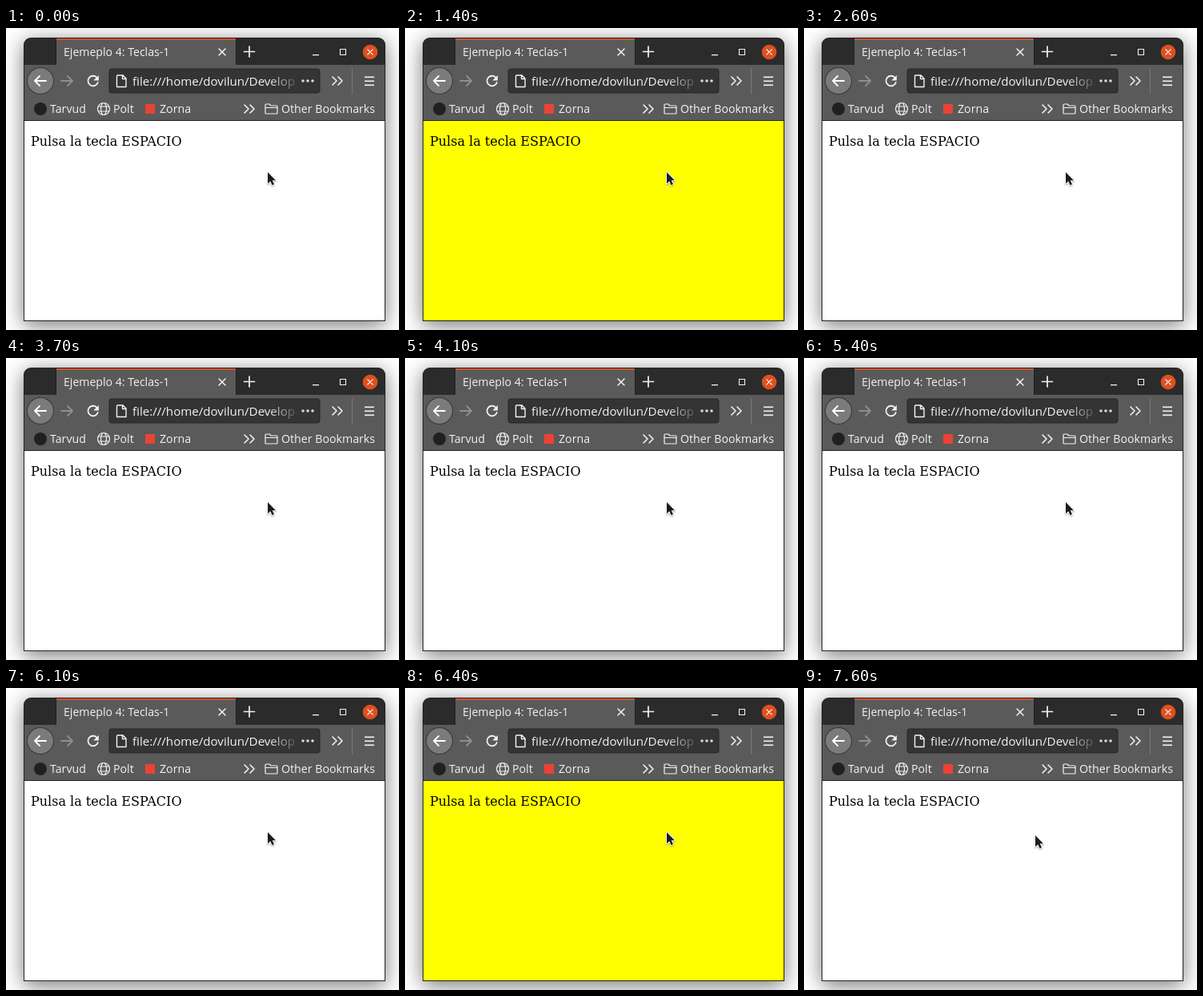
Animation of 491 by 377 pixels, one loop 8000 ms. Source, as an HTML page with a canvas:

```html
<!DOCTYPE html>
<html lang="es">
<head>
<meta charset="utf-8">
<title>Teclas</title>
<style>
html, body { margin: 0; width: 100%; height: 100%; overflow: hidden; background: #fff; }
canvas { display: block; width: 491px; height: 377px; }
</style>
</head>
<body>
<canvas id="stage"></canvas>
<script>
const W = 491, H = 377, LOOP = 8000;
const canvas = document.getElementById('stage');
const ctx = canvas.getContext('2d');
const dpr = window.devicePixelRatio || 1;
canvas.width = W * dpr;
canvas.height = H * dpr;

const UI = '"Open Sans", "Noto Sans", sans-serif';
const SERIF = '"DejaVu Serif", "Noto Serif", serif';
const LIGHT = '#f2f2f0', BAR = '#5a5a5a', DARK = '#2b2b2b';

// Each press of the space bar toggles the page colour.
const presses = [1400, 2600, 3500, 3700, 3900, 4100, 5000, 5400, 5700, 6100, 6400, 6900];

function rect(x, y, w, h, color) {
  ctx.fillStyle = color;
  ctx.fillRect(x, y, w, h);
}

function rounded(x, y, w, h, r, color) {
  ctx.beginPath();
  ctx.roundRect(x, y, w, h, r);
  ctx.fillStyle = color;
  ctx.fill();
}

function disc(x, y, r, color) {
  ctx.beginPath();
  ctx.arc(x, y, r, 0, Math.PI * 2);
  ctx.fillStyle = color;
  ctx.fill();
}

function stroke(d, color = LIGHT, width = 1.6) {
  ctx.strokeStyle = color;
  ctx.lineWidth = width;
  ctx.lineCap = ctx.lineJoin = 'round';
  ctx.stroke(new Path2D(d));
}

function text(str, x, y, size, color = LIGHT, family = UI) {
  ctx.font = `${size}px ${family}`;
  ctx.fillStyle = color;
  ctx.fillText(str, x, y);
}

function chevrons(x, y) {
  stroke(`M${x} ${y - 5}l5 5l-5 5M${x + 7} ${y - 5}l5 5l-5 5`);
}

function drawFrame() {
  ctx.save();
  ctx.shadowColor = 'rgba(0,0,0,.55)';
  ctx.shadowBlur = 26 * dpr;
  ctx.shadowOffsetY = 5 * dpr;
  rounded(22, 12, 452, 354, [9, 9, 0, 0], '#232323');
  ctx.restore();
  rounded(23, 13, 450, 34, [8, 8, 0, 0], DARK);
  rect(23, 46, 450, 69, BAR);
  rect(23, 115, 450, 1, '#242424');
}

function drawTabs() {
  rect(62, 13, 226, 33, '#1f1f1f');
  rect(63, 13, 224, 33, BAR);
  rect(63, 13, 224, 2, '#c9552c');
  text('Ejemeplo 4: Teclas-1', 72, 35, 14.1);
  stroke('M266 26l8 8m0 -8l-8 8', LIGHT, 1.5);
  stroke('M297.5 29.5h13m-6.5 -6.5v13', LIGHT, 1.7);
  rect(383, 33, 8, 1.3, LIGHT);
  ctx.strokeStyle = LIGHT;
  ctx.lineWidth = 1.1;
  ctx.strokeRect(417.5, 26.5, 7, 7);
  disc(455, 30, 9.3, '#dd5021');
  stroke('M451.8 26.8l6.4 6.4m0 -6.4l-6.4 6.4', '#fff', 1.2);
}

function drawToolbar() {
  disc(43, 66, 17, '#373737');
  disc(43, 66, 16, '#7b7b7b');
  stroke('M50 66h-14m6 -6l-6 6l6 6', '#fff', 1.8);
  stroke('M69 66h14m-6 -6l6 6l-6 6', '#8f8f8f', 1.8);
  stroke('M113.8 62.2A6.3 6.3 0 1 0 114.8 68', LIGHT, 1.8);
  ctx.fillStyle = LIGHT;
  ctx.fill(new Path2D('M115.8 59v6.5h-6.5z'));

  rounded(128.5, 50.5, 264, 31, 4, '#272727');
  rounded(129.5, 51.5, 262, 29, 3, '#343434');
  stroke('M139.5 59h6.5l4 4v10.5h-11.5v-13.5a1 1 0 0 1 1 -1zM145.5 59.5v4h4', LIGHT, 1.4);
  const fade = ctx.createLinearGradient(328, 0, 364, 0);
  fade.addColorStop(0, LIGHT);
  fade.addColorStop(1, 'rgba(242,242,240,.12)');
  ctx.save();
  ctx.beginPath();
  ctx.rect(156, 52, 207, 28);
  ctx.clip();
  text('file:///home/dovilun/Develop', 158, 72, 15.1, fade);
  ctx.restore();
  for (const x of [371, 377, 383]) disc(x, 66, 1.8, '#d8d8d8');

  chevrons(408, 66);
  rect(432, 50, 1, 33, '#777');
  for (const y of [61, 66, 71]) rect(448, y - 0.5, 12, 1.6, LIGHT);
}

function drawBookmarks() {
  disc(43, 101, 8, '#202020');
  text('Tarvud', 55, 106, 14.2);
  stroke('M114.5 101a7.5 7.5 0 1 0 15 0a7.5 7.5 0 1 0 -15 0' +
    'M118.5 101a3.5 7.5 0 1 0 7 0a3.5 7.5 0 1 0 -7 0' +
    'M115.5 98h13m-13 6h13', LIGHT, 1.2);
  text('Polt', 134, 106, 14.2);
  rect(174, 95, 12, 12, '#ea4335');
  text('Zorna', 192, 106, 14.2);
  chevrons(298, 101);
  stroke('M324 106v-10a1 1 0 0 1 1 -1h4l2 2h7a1 1 0 0 1 1 1v8a1 1 0 0 1 -1 1h-13a1 1 0 0 1 -1 -1zM324 99.5h15', LIGHT, 1.2);
  text('Other Bookmarks', 344, 106, 14.2);
}

function drawPage(t) {
  const active = presses.filter(p => p <= t).length % 2;
  rect(23, 116, 450, 249, active ? '#ffff00' : '#fff');
  text('Pulsa la tecla ESPACIO', 31, 147, 16, '#000', SERIF);
}

function drawCursor(t) {
  // The pointer moves in four 100 ms steps.
  const step = Math.max(0, Math.min(4, Math.floor((t - 7200) / 100)));
  const k = step / 4;
  ctx.save();
  ctx.translate(327 - 38 * k, 180 + 4 * k);
  const arrow = new Path2D('M0 0V14.2L3.3 11.2L5.6 16.2L8 15.1L5.7 10.3H10z');
  ctx.lineJoin = 'round';
  ctx.strokeStyle = '#fff';
  ctx.lineWidth = 2;
  ctx.shadowColor = 'rgba(0,0,0,.35)';
  ctx.shadowBlur = 2 * dpr;
  ctx.shadowOffsetY = dpr;
  ctx.stroke(arrow);
  ctx.shadowColor = 'transparent';
  ctx.fillStyle = '#1c1c1c';
  ctx.fill(arrow);
  ctx.restore();
}

function draw(t) {
  ctx.setTransform(dpr, 0, 0, dpr, 0, 0);
  rect(0, 0, W, H, '#fff');
  drawFrame();
  drawTabs();
  drawToolbar();
  drawBookmarks();
  drawPage(t);
  drawCursor(t);
}

const start = performance.now();
function tick() {
  draw((performance.now() - start) % LOOP);
  requestAnimationFrame(tick);
}
tick();
</script>
</body>
</html>
```
